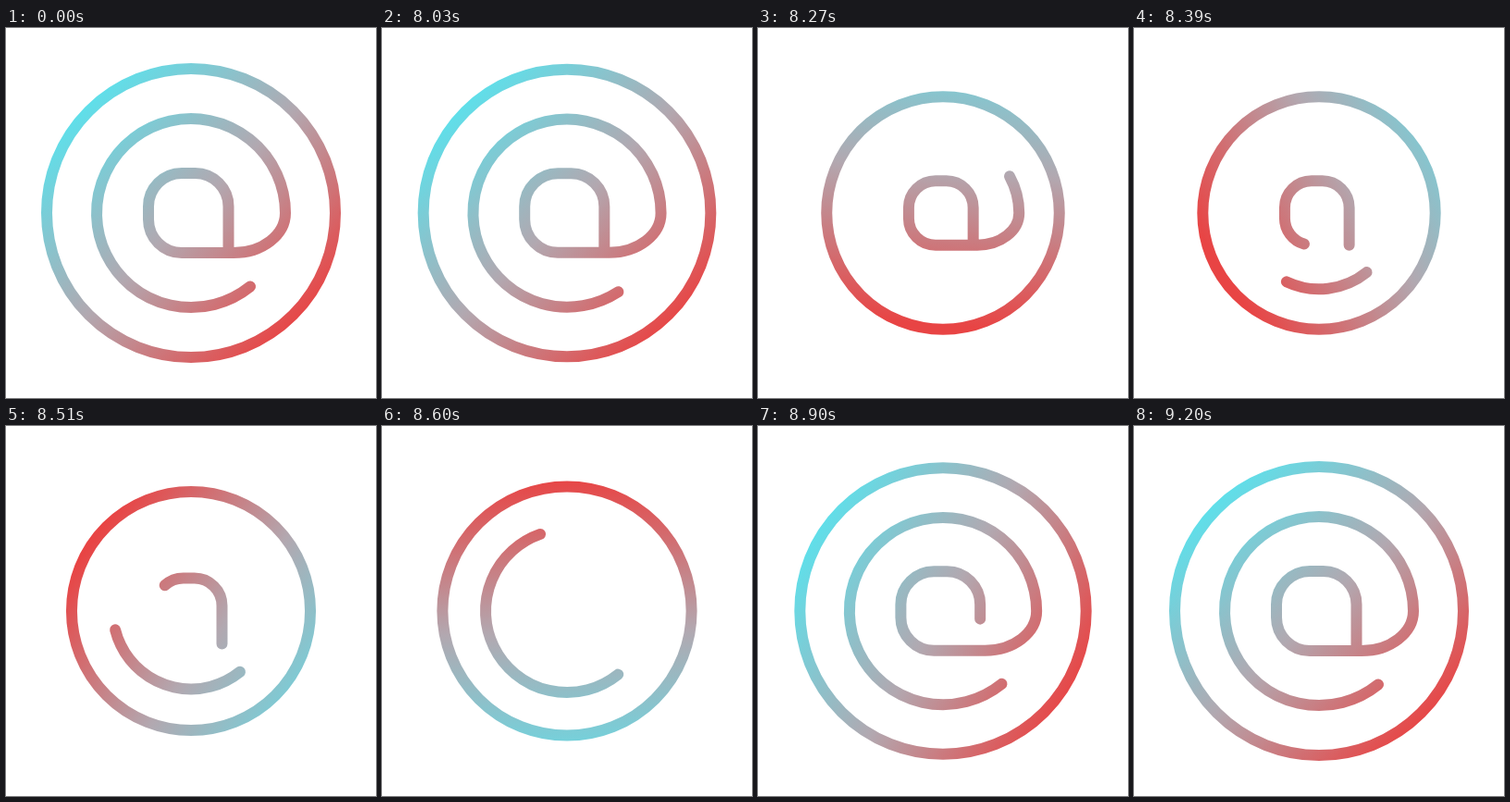
Write an HTML page that moves like this. It is 400 px wide and 400 px high and loops after 9.23 s.

```html
<!DOCTYPE html>
<html lang="en">
<head>
<meta charset="utf-8">
<title>At sign loop</title>
<style>
  html, body { margin: 0; width: 100%; height: 100%; overflow: hidden; background: #fff; }
  svg { display: block; width: 100vw; height: 100vh; }
  #icon { fill: none; stroke: url(#tint); stroke-linecap: round; stroke-linejoin: round; }
</style>
</head>
<body>
<svg viewBox="-200 -200 400 400">
  <defs>
    <linearGradient id="tint" gradientUnits="userSpaceOnUse" x1="-168" y1="0" x2="168" y2="0">
      <stop offset="0" stop-color="#5ce1ec"/>
      <stop offset=".5" stop-color="#b2a8b0"/>
      <stop offset="1" stop-color="#e84444"/>
    </linearGradient>
  </defs>
  <g id="icon">
    <circle r="156"/>
    <path id="at" d="M64 79.5 A102 102 0 1 1 102 0 A56 43 0 0 1 46 43 H-10
      a36 36 0 0 1 -36 -36 V-7 a36 36 0 0 1 36 -36 H4.5 a36 36 0 0 1 36 36 V43"/>
  </g>
</svg>
<script>
  const LOOP = 9230, START = 8000, STEP = 30;
  const GAP = 579, PAUSE = 690;
  const icon = document.getElementById('icon');
  const at = document.getElementById('at');
  const tint = document.getElementById('tint');
  const length = at.getTotalLength();
  at.setAttribute('stroke-dasharray', `${length} ${GAP}`);

  const bezier = (x1, y1, x2, y2) => x => {
    if (x <= 0) return 0;
    if (x >= 1) return 1;
    const curve = (a, b, u) => 3 * a * u * (1 - u) ** 2 + 3 * b * u * u * (1 - u) + u ** 3;
    let lo = 0, hi = 1;
    for (let i = 0; i < 30; i++) {
      const mid = (lo + hi) / 2;
      if (curve(x1, x2, mid) < x) lo = mid; else hi = mid;
    }
    return curve(y1, y2, lo);
  };
  const easeInOut = bezier(.42, 0, .58, 1);
  const easeErase = bezier(.33, 0, .7, .8);
  const span = (t, from, to, ease) => ease((t - from) / (to - from));

  function pose(t) {
    const grow = span(t, 362, 992, easeInOut);
    const scale = 1 - .195 * (span(t, 0, 286, easeInOut) - grow);
    const trim = PAUSE * span(t, 0, 368, easeErase) + (length + GAP - PAUSE) * grow;
    const angle = 45 + 360 * span(t, 0, 1050, easeInOut);
    // the tint leans towards red while the icon is small
    const shift = -1250 * (1 - scale) ** 2;

    icon.setAttribute('transform', `scale(${scale})`);
    icon.setAttribute('stroke-width', 12 / scale);
    at.setAttribute('stroke-dashoffset', -trim);
    tint.setAttribute('gradientTransform',
      `scale(${1 / scale}) rotate(${angle}) translate(${shift} 0)`);
  }

  function draw() {
    const t = performance.now() % LOOP - START;
    pose(Math.max(0, Math.floor((t + 1) / STEP) * STEP));
    requestAnimationFrame(draw);
  }
  draw();
</script>
</body>
</html>
```
